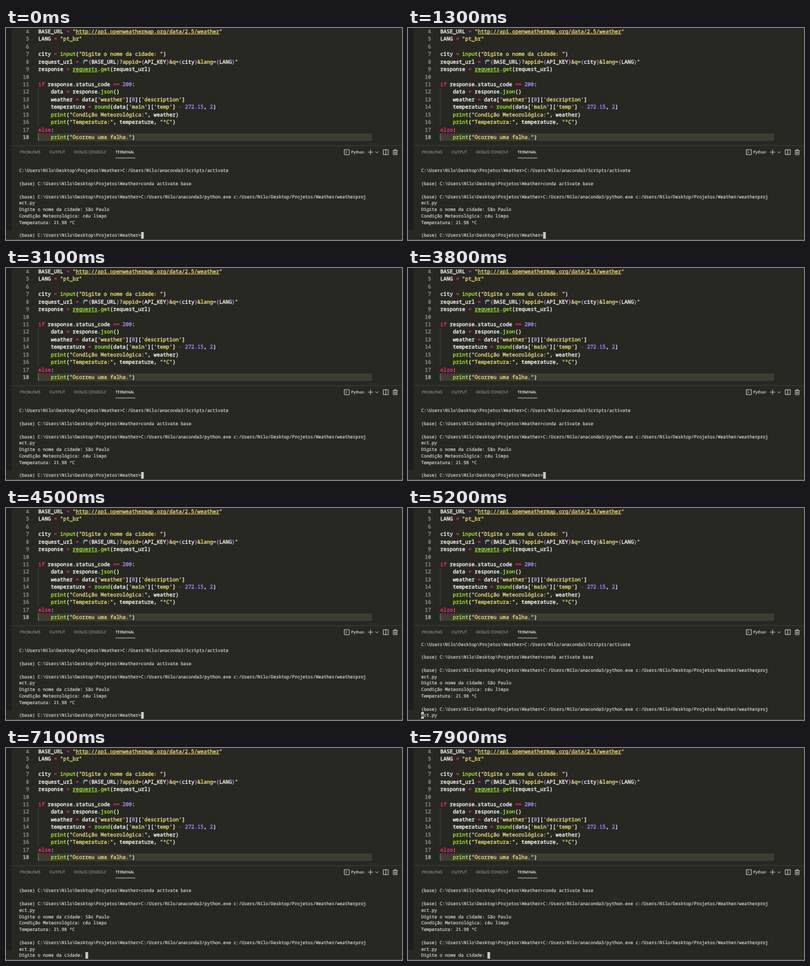
Write an HTML page that moves like this. It is 600 px wide and 321 px high and loops after 8 s.

```html
<!DOCTYPE html>
<html lang="pt-BR">
<head>
<meta charset="utf-8">
<title>Terminal</title>
<style>
html, body { margin: 0; width: 100%; height: 100%; overflow: hidden; background: #272822; }
svg { display: block; width: 600px; height: 321px; }
text { white-space: pre; text-rendering: geometricPrecision; }
.code { font: 7.89px "Noto Sans Mono", "DejaVu Sans Mono", monospace; stroke-width: 0.32px; }
.term { font: 6.69px "Noto Sans Mono", "DejaVu Sans Mono", monospace; stroke-width: 0.22px; }
.ui { font: 6px "Open Sans", "Noto Sans", sans-serif; stroke-width: 0.15px; }
</style>
</head>
<body>
<svg id="stage" viewBox="0 0 600 321" xmlns="http://www.w3.org/2000/svg"></svg>
<script>
const stage = document.getElementById('stage');
const C = {
  text: '#f8f8f2', string: '#e6db74', keyword: '#f92672', prefix: '#66d9ef',
  name: '#a6e22e', number: '#ae81ff', bg: '#272822', term: '#cccccc'
};

function add(tag, attrs, parent = stage) {
  const el = document.createElementNS('http://www.w3.org/2000/svg', tag);
  for (const key in attrs) el.setAttribute(key, attrs[key]);
  parent.appendChild(el);
  return el;
}
const rect = (x, y, width, height, fill) => add('rect', { x, y, width, height, fill });
const stroke = (d, color) => add('path', { d, fill: 'none', stroke: color, 'stroke-width': 0.85 });
// A thin stroke in the text colour gives the letters their weight.
function label(cls, x, y, fill, str = '', more = {}) {
  const el = add('text', { class: cls, x, y, fill, stroke: fill, 'xml:space': 'preserve', ...more });
  el.textContent = str;
  return el;
}

// Editor
const CODE_X = 49, CODE_W = 4.734, LINE_H = 11.45;
const lineMid = n => 165.3 - (18 - n) * LINE_H;
const code = {
  4: 'BASE_URL = "http://api.openweathermap.org/data/2.5/weather"',
  5: 'LANG = "pt_br"',
  6: '',
  7: 'city = input("Digite o nome da cidade: ")',
  8: 'request_url = f"{BASE_URL}?appid={API_KEY}&q={city}&lang={LANG}"',
  9: 'response = requests.get(request_url)',
  10: '',
  11: 'if response.status_code == 200:',
  12: '    data = response.json()',
  13: "    weather = data['weather'][0]['description']",
  14: "    temperature = round(data['main']['temp'] - 272.15, 2)",
  15: '    print("Condição Meteorológica:", weather)',
  16: '    print("Temperatura:", temperature, "ºC")',
  17: 'else:',
  18: '    print("Ocorreu uma falha.")'
};
const kinds = ['prefix', 'string', 'keyword', 'name', 'number'];
const TOKEN = /(f(?="))|("[^"]*"|'[^']*')|(\b(?:if|else)\b|==?|-)|\b(print|input|round|requests|get|json)\b|\b(\d+(?:\.\d+)?)\b/g;

function span(parent, str, fill, more) {
  if (str) add('tspan', { fill, stroke: fill, ...more }, parent).textContent = str;
}

function codeLine(n, src) {
  const y = lineMid(n) + 2.8;
  label('code', 35, y, n === 18 ? '#c2c2bf' : '#90908a', n, { 'text-anchor': 'end' });
  if (src.startsWith(' ')) {
    rect(CODE_X - 0.4, lineMid(n) - LINE_H / 2, 0.8, LINE_H, n === 18 ? '#8a8a80' : '#464741');
  }
  const line = label('code', CODE_X, y, C.text);
  let pos = 0;
  for (const m of src.matchAll(TOKEN)) {
    span(line, src.slice(pos, m.index), C.text);
    const kind = kinds[m.slice(1).findIndex(g => g !== undefined)];
    if (kind === 'prefix') {
      span(line, m[0], C.prefix, { 'font-style': 'italic' });
    } else if (kind === 'string') {
      for (const part of m[0].split(/([{}])/)) {
        const brace = part === '{' || part === '}';
        const field = /^[A-Za-z_]+$/.test(part) && m[0].includes('{');
        span(line, part, brace ? C.number : field ? C.text : C.string);
      }
    } else {
      span(line, m[0], C[kind]);
    }
    pos = m.index + m[0].length;
  }
  span(line, src.slice(pos), C.text);
}

function underline(n, word, color) {
  const col = code[n].indexOf(word);
  rect(CODE_X + col * CODE_W, lineMid(n) + 3.8, word.length * CODE_W, 0.8, color);
}

rect(0, 0, 600, 321, C.bg);
rect(0, 0, 8.5, 306.5, '#1e1f1c');
rect(CODE_X - 0.5, lineMid(18) - LINE_H / 2, 506, LINE_H, '#3e3d32');
for (const n in code) codeLine(+n, code[n]);
underline(4, 'http://api.openweathermap.org/data/2.5/weather', C.string);
underline(9, 'requests', C.name);

// Panel header
const dim = '#8b8b87', bright = '#f0f0ec', icon = '#d8d8d4';
rect(8.5, 177.6, 591.5, 0.8, '#414339');
label('ui', 21, 190.2, dim, 'PROBLEMS');
label('ui', 65.8, 190.2, dim, 'OUTPUT');
label('ui', 103, 190.2, dim, 'DEBUG CONSOLE');
label('ui', 166, 190.2, bright, 'TERMINAL');
rect(166, 196.5, 30, 0.8, '#d8d8d0');
label('ui', 523, 190.2, icon, 'Python');
stroke('M512.6 184.2h7.6v7.6h-7.6zM514.4 186.2l2 1.8l-2 1.8', icon);
stroke('M548.4 188h7.8M552.3 184.1v7.8', icon);
stroke('M559.8 187l2.3 2.3l2.3 -2.3', icon);
stroke('M571.6 184.3h7.6v7.4h-7.6zM575.4 184.3v7.4', icon);
stroke('M586 185.6h7.4M588.3 185.4v-1.2h2.8v1.2M587 185.8v6h5.4v-6M588.9 187.2v3.2M590.6 187.2v3.2', icon);

// Terminal
const TERM_X = 20, TERM_W = 4.015, ROW_H = 9.8, ROWS = 12;
const rowMid = i => 314 - (ROWS - 1 - i) * ROW_H;
const dir = 'C:\\Users\\Nilo\\Desktop\\Projetos\\Weather>';
const conda = 'C:/Users/Nilo/anaconda3/';
const prompt = '(base) ' + dir;
const run = prompt + conda + 'python.exe c:/Users/Nilo/Desktop/Projetos/Weather/weatherproj';
const ask = 'Digite o nome da cidade: ';
const history = [
  '', dir + conda + 'Scripts/activate', '', prompt + 'conda activate base', '',
  run, 'ect.py', ask + 'São Paulo', 'Condição Meteorológica: céu limpo',
  'Temperatura: 21.98 ºC', ''
];
const steps = [
  { at: 0, tail: [prompt], col: prompt.length },
  { at: 5100, tail: [run, 'ect.py'], col: 0 },
  { at: 5300, tail: [run, 'ect.py', ''], col: 0 },
  { at: 5700, tail: [run, 'ect.py', ask], col: ask.length }
];

const cursor = rect(0, rowMid(ROWS - 1) - 5, TERM_W, 10, C.term);
const rows = Array.from({ length: ROWS }, (_, i) => label('term', TERM_X, rowMid(i) + 2.3, C.term));
const under = label('term', 0, rowMid(ROWS - 1) + 2.3, C.bg);
rect(0, 320, 600, 1, '#414339');

let shown;
function show(step) {
  const lines = [...history, ...step.tail].slice(-ROWS);
  rows.forEach((row, i) => { row.textContent = lines[i]; });
  const x = TERM_X + step.col * TERM_W;
  cursor.setAttribute('x', x);
  // Hide the light glyph below the cursor, then draw it dark.
  const last = lines[ROWS - 1];
  under.setAttribute('x', x);
  under.textContent = last[step.col] || '';
}

function frame() {
  const t = performance.now() % 8000;
  const step = steps.filter(s => s.at <= t).pop();
  if (step !== shown) show(shown = step);
  requestAnimationFrame(frame);
}
frame();
</script>
</body>
</html>
```
